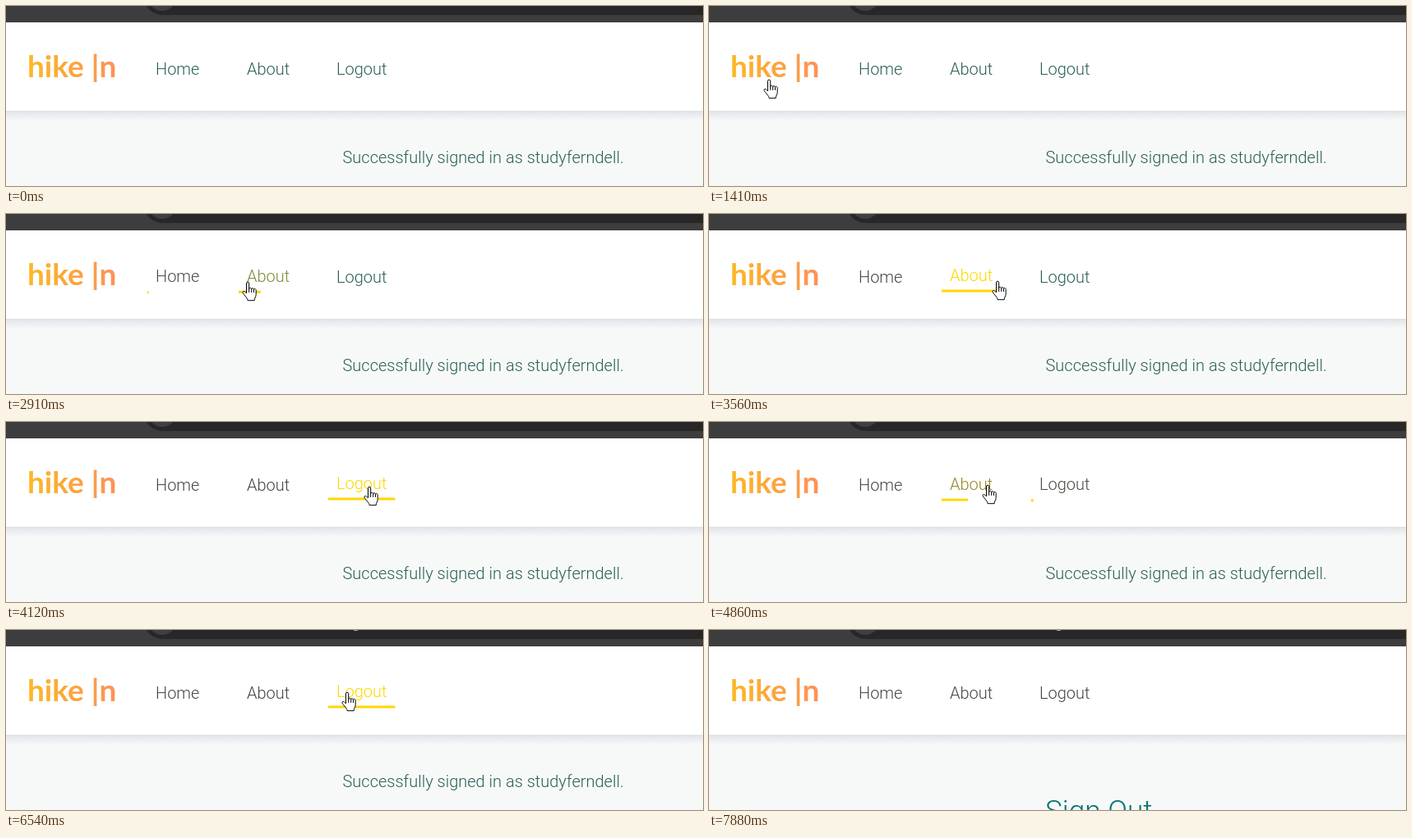
An HTML page for the animation above (8000 ms loop, 848 px wide and 220 px high).

```html
<!DOCTYPE html>
<html lang="en">
<head>
<meta charset="utf-8">
<title>Navigation hover</title>
<style>
  html, body { margin: 0; width: 100%; height: 100%; overflow: hidden; background: #f7f9f9; }
  svg { display: block; width: 848px; height: 220px; }
  text { font: 300 20px Roboto, sans-serif; white-space: pre; }
  .logo { font: 700 37px Lato, sans-serif; fill: url(#sunset); }
  .message { fill: #2a6057; }
  .heading { font-size: 35.2px; fill: #08736f; }
  .pointer { fill: #fff; stroke: #000; stroke-linejoin: round; stroke-linecap: round; }
</style>
</head>
<body>
<svg viewBox="0 0 848 220">
  <defs>
    <linearGradient id="sunset" gradientUnits="userSpaceOnUse" x1="26" x2="132" y1="0" y2="0">
      <stop stop-color="#fcb726"/><stop offset="1" stop-color="#fd9255"/>
    </linearGradient>
    <linearGradient id="shade" x2="0" y2="1">
      <stop stop-color="#dfe2e5"/><stop offset=".4" stop-color="#ebeef0"/><stop offset="1" stop-color="#f7f9f9"/>
    </linearGradient>
  </defs>

  <rect width="848" height="220" fill="#f7f9f9"/>
  <rect y="128" width="848" height="13" fill="url(#shade)"/>
  <rect y="20" width="848" height="108" fill="#fff"/>

  <rect width="848" height="20" fill="#3c3d3c"/>
  <rect x="168" y="-33" width="800" height="44" rx="22" fill="#272727"/>
  <circle cx="190" cy="-11" r="17" fill="#3e3f3e"/>
  <path id="address" d="M423 0h5" stroke="#c4c4c4" stroke-width="1.6"/>

  <text class="logo" x="26" y="87">hike |n</text>
  <g id="links"></g>
  <text id="message" class="message" x="409.5" y="192">Successfully signed in as studyferndell.</text>
  <text id="heading" class="heading" x="409" y="233">Sign Out</text>

  <circle id="click" cx="414" cy="76" r="15" fill="#ffd700" fill-opacity=".3"/>
  <g id="pointer" class="pointer">
    <g id="hand" transform="translate(-6.5 -.5)">
      <path d="M5 14V2.3a1.6 1.6 0 0 1 3.2 0V9c0-1.7 3-1.7 3 .3c0-1.6 2.8-1.4 2.8.6c.2-1.5 2.7-1.2 2.7.8V16c0 3-2 4-2 7.2H6.6c0-3.2-4.4-6-6-9.5c-.6-1.9 1.7-2.3 2.7-1.1z"/>
      <path d="M8.2 9v4M11.2 9.6v3.4M14 10.2v2.8" fill="none"/>
    </g>
    <path id="arrow" d="M.5 .5V16.2l3.6-3.3 2.5 5.7 2.4-1-2.4-5.5h5z"/>
  </g>
</svg>
<script>
const LOOP = 8000, FADE = 300, TICK = 70, PAGE_SWAP = 6670;
const PADDING = 10, LIFT = 2;
const TEAL = [42, 96, 87], DARK = [70, 70, 70], GOLD = [255, 215, 0];

const settle = u => 1 - (1 - u) ** 2;
const swing = u => u * u * (3 - 2 * u);

// The pointer glides from one resting place to the next.
const entry = { x: 163, y: 186 };
const moves = [
  { start: 800, end: 1480, x: 72, y: 89, curve: settle },
  { start: 1610, end: 2300, x: 200, y: 85, curve: settle },
  { start: 2490, end: 3170, x: 313, y: 83, curve: settle },
  { start: 3430, end: 4180, x: 443, y: 79, curve: settle },
  { start: 4290, end: 4990, x: 327, y: 77, curve: swing },
  { start: 5060, end: 5540, x: 415, y: 76, curve: settle },
  { start: 6670, end: 7080, x: 620, y: 93, curve: settle },
  { start: 7600, end: 7880, x: 531, y: 200, curve: swing }
];

const links = [
  { label: 'Home', left: 172 },
  { label: 'About', left: 283 },
  { label: 'Logout', left: 392 }
];

const $ = id => document.getElementById(id);
const show = (id, on) => $(id).style.display = on ? '' : 'none';
const clamp = v => Math.min(1, Math.max(0, v));
const mix = (a, b, k) => a + (b - a) * k;

function add(parent, tag, attrs) {
  const el = document.createElementNS('http://www.w3.org/2000/svg', tag);
  for (const name in attrs) el.setAttribute(name, attrs[name]);
  return parent.appendChild(el);
}

// The CSS "ease" curve, solved for x by bisection.
function ease(x) {
  const bezier = (s, a, b) => 3 * s * (1 - s) ** 2 * a + 3 * s * s * (1 - s) * b + s ** 3;
  let low = 0, high = 1;
  for (let i = 0; i < 18; i++) {
    const mid = (low + high) / 2;
    if (bezier(mid, .25, .25) < x) low = mid; else high = mid;
  }
  return bezier(low, .1, 1);
}

function recorded(t) {
  const move = moves.find(m => t >= m.start && t < m.end);
  return move ? Math.max(move.start, move.end - Math.ceil((move.end - t) / TICK) * TICK) : t;
}

function pointerAt(t) {
  return moves.reduce((from, { start, end, x, y, curve }) => {
    const k = curve(clamp((t - start) / (end - start)));
    return { x: mix(from.x, x, k), y: mix(from.y, y, k) };
  }, entry);
}

const within = ({ x, y }, left, width) => y < 105 && x >= left && x <= left + width;

// Times at which the pointer enters and leaves a link, in turn.
function crossings({ left, width }) {
  const times = [];
  for (let t = 0, inside = false; t < LOOP; t += 10) {
    if (within(pointerAt(t), left, width) !== inside) {
      inside = !inside;
      times.push(t);
    }
  }
  return times;
}

for (const link of links) {
  link.group = add($('links'), 'g', {});
  link.text = add(link.group, 'text', { x: link.left + PADDING, y: 83.5 });
  link.text.textContent = link.label;
  link.width = link.text.getComputedTextLength() + 2 * PADDING;
  link.line = add(link.group, 'rect', { x: link.left, y: 94.5, height: 3, fill: '#ffd700' });
  link.crossings = crossings(link);
}

function drawLink({ group, text, line, width, crossings }, t) {
  const k = crossings.reduce((sum, time, i) =>
    sum + (i % 2 ? -1 : 1) * ease(clamp((t - time) / FADE)), 0);
  const base = t > crossings[0] + FADE ? DARK : TEAL;
  text.setAttribute('fill', `rgb(${base.map((c, i) => Math.round(mix(c, GOLD[i], k)))})`);
  group.setAttribute('transform', `translate(0 ${-LIFT * k})`);
  line.setAttribute('width', Math.max(0, width * k));
}

function draw(now) {
  const t = recorded(now);
  links.forEach(link => drawLink(link, t));

  const tip = pointerAt(t);
  const active = within(tip, 26, 107) || links.some(l => within(tip, l.left, l.width));
  $('pointer').setAttribute('transform', `translate(${Math.round(tip.x)} ${Math.round(tip.y)})`);
  show('pointer', t >= 800 && t < 7880);
  show('hand', active);
  show('arrow', !active);

  show('click', t >= 5870 && t < 6000);
  show('address', t >= 6540);
  show('message', t < PAGE_SWAP);
  show('heading', t >= PAGE_SWAP);
}

const begin = performance.now();
function frame() {
  draw((performance.now() - begin) % LOOP);
  requestAnimationFrame(frame);
}
frame();
</script>
</body>
</html>
```
